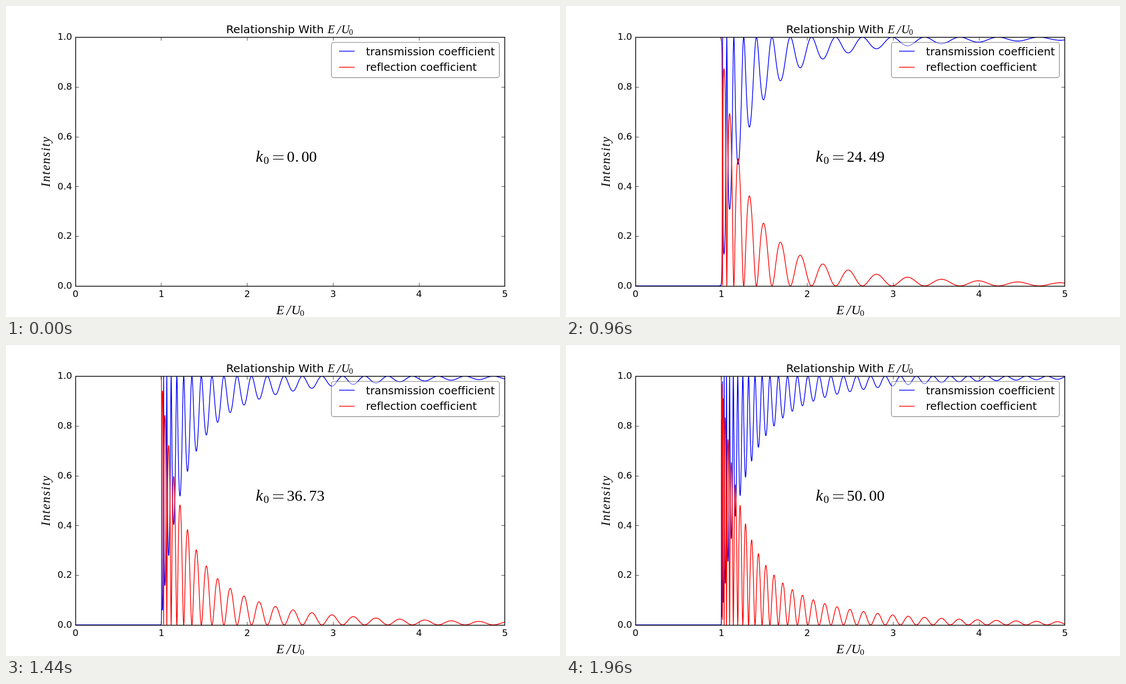
An HTML page with a canvas that plays this animation: 998 px wide and 561 px high, repeating every 2000 ms.

```html
<!DOCTYPE html>
<html>
<head>
<meta charset="utf-8">
<style>
html, body { margin: 0; width: 100%; height: 100%; overflow: hidden; background: #fff; }
canvas { display: block; }
</style>
</head>
<body>
<canvas id="stage" width="998" height="561"></canvas>
<script>
const ctx = document.getElementById('stage').getContext('2d');
const SANS = '"DejaVu Sans", sans-serif';
const SERIF = '"Liberation Serif", serif';
const LEFT = 124.75, RIGHT = 898.2, TOP = 56.1, BOTTOM = 504.9;
const SAMPLES = 10000, STEPS = 50, STEP_MS = 40, LINE = 1.39;
const px = e => LEFT + e / 5 * (RIGHT - LEFT);
const py = v => BOTTOM - v * (BOTTOM - TOP);
const snap = v => Math.floor(v + 0.5) + 0.5;

// A tiny letter spacing also keeps "ffi" from becoming a ligature.
function text(s, x, y, size, family = SANS, style = '', align = 'left', spacing = 0.01) {
  ctx.font = `${style} ${size}px ${family}`;
  ctx.letterSpacing = spacing + 'px';
  ctx.textAlign = align;
  ctx.fillStyle = '#000';
  ctx.fillText(s, x, y);
}

function line(x1, y1, x2, y2, color = '#000', width = LINE) {
  ctx.strokeStyle = color;
  ctx.lineWidth = width;
  ctx.beginPath();
  ctx.moveTo(x1, y1);
  ctx.lineTo(x2, y2);
  ctx.stroke();
}

// Transmission through a square barrier, energy e in units of its height
function transmission(e, k) {
  const d = e - 1, q = k * Math.sqrt(Math.abs(d));
  const s = d > 0 ? Math.sin(q) : Math.sinh(q);
  return 1 / (1 + s * s / (4 * e * Math.abs(d)));
}

function curve(f, color) {
  ctx.beginPath();
  for (let i = 1; i < SAMPLES; i++) {
    const e = 5 * i / (SAMPLES - 1);
    ctx.lineTo(px(e), py(f(e)));
  }
  ctx.strokeStyle = color;
  ctx.lineWidth = LINE;
  ctx.lineJoin = 'round';
  ctx.stroke();
}

function curves(k) {
  ctx.save();
  ctx.beginPath();
  ctx.rect(125, 56, 773, 449);
  ctx.clip();
  curve(e => transmission(e, k), '#00f');
  curve(e => 1 - transmission(e, k), '#f00');
  ctx.restore();
}

function axes() {
  const l = snap(LEFT), r = snap(RIGHT), t = snap(TOP), b = snap(BOTTOM);
  for (let i = 0; i <= 5; i++) {
    const x = snap(px(i)), y = snap(py(i / 5));
    line(x, b, x, b - 6, '#000', 0.69);
    line(x, t, x, t + 6, '#000', 0.69);
    line(l, y, l + 6, y, '#000', 0.69);
    line(r, y, r - 6, y, '#000', 0.69);
    text(i, px(i) + 0.5, 525, 16.67, SANS, '', 'center');
    text((i / 5).toFixed(1), 119.2, Math.round(py(i / 5) + 5.2), 16.67, SANS, '', 'right');
  }
  ctx.lineWidth = LINE;
  ctx.strokeStyle = '#000';
  ctx.strokeRect(l, t, r - l, b - t);
}

function ratio(x, y, size) {
  text('E', x, y, size * 1.04, SERIF, 'italic');
  text('/', x + 0.82 * size, y + 0.1 * size, size * 1.2, SERIF, 'italic');
  text('U', x + 1.22 * size, y, size * 1.04, SERIF, 'italic');
  text('0', x + 1.92 * size, y + 0.15 * size, size * 0.7, SERIF);
}

function labels() {
  text('Relationship With', 396.5, 49, 20.15);
  ratio(579.5, 49, 20);
  ratio(487, 556, 22.2);
  ctx.save();
  ctx.translate(79, 326.5);
  ctx.rotate(-Math.PI / 2);
  text('Intensity', 0, 0, 22.2, SERIF, 'italic', 'left', 1.75);
  ctx.restore();
}

function counter(k) {
  const size = 27.78, y = 281;
  const [whole, part] = k.toFixed(2).split('.');
  const dot = 506 + whole.length * size / 2;
  text('k', 450, y, size * 1.04, SERIF, 'italic');
  text('0', 464, y + 4.3, size * 0.7, SERIF);
  line(481, 269.9, 500, 269.9, '#000', 1.2);
  line(481, 276.4, 500, 276.4, '#000', 1.2);
  text(whole, 506, y, size, SERIF);
  text('.', dot + 0.8, y, size, SERIF);
  text(part, dot + 12.3, y, size, SERIF);
}

function legend() {
  ctx.beginPath();
  ctx.roundRect(586.3, 65.6, 302.4, 63.7, 4);
  ctx.fillStyle = 'rgba(255,255,255,0.5)';
  ctx.fill();
  ctx.strokeStyle = 'rgba(0,0,0,0.4)';
  ctx.lineWidth = LINE;
  ctx.stroke();
  line(600, 81.5, 628, 81.5, '#00f');
  line(600, 110.5, 628, 110.5, '#f00');
  text('transmission coefficient', 648.4, 89, 19.44);
  text('reflection coefficient', 648.4, 117, 19.44);
}

function draw(step) {
  const k = 50 * step / (STEPS - 1);
  ctx.fillStyle = '#fff';
  ctx.fillRect(0, 0, 998, 561);
  if (step) curves(k);
  axes();
  labels();
  counter(k);
  legend();
}

let start, shown = -1;
function tick(now) {
  start ??= now;
  const step = Math.floor((now - start) / STEP_MS) % STEPS;
  if (step !== shown) draw(shown = step);
  requestAnimationFrame(tick);
}
draw(0);
requestAnimationFrame(tick);
</script>
</body>
</html>
```
